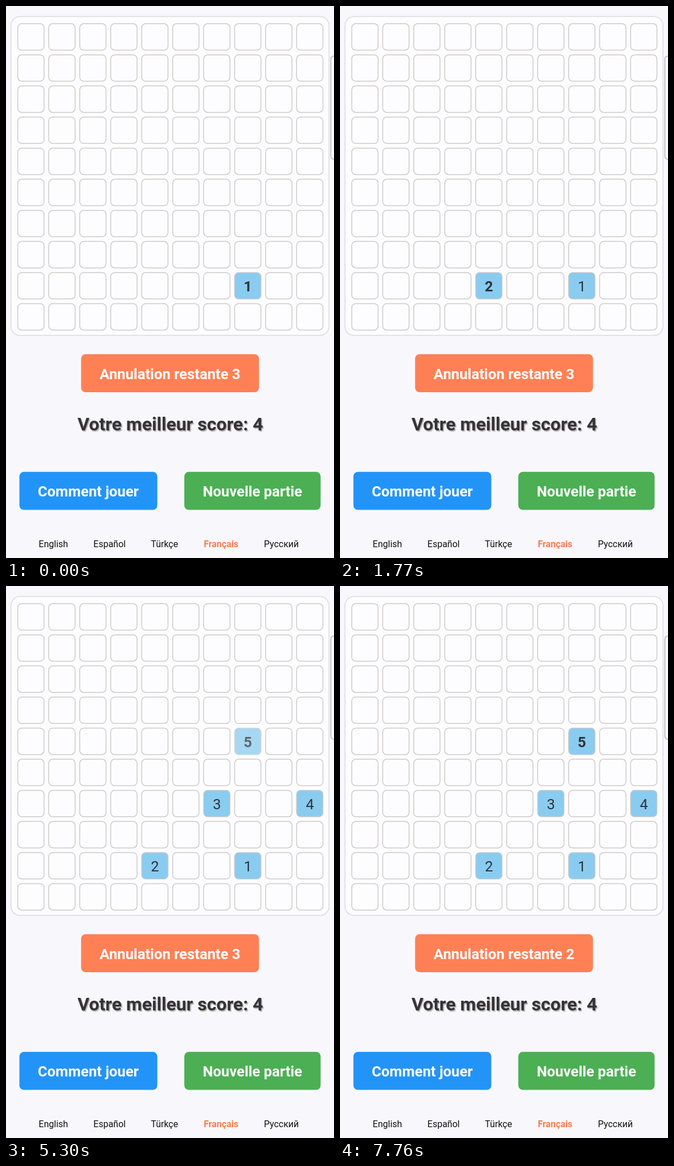
An HTML page that plays this animation: 578x969 px, repeating every 8000 ms.

```html
<!DOCTYPE html>
<html lang="fr">
<head>
<meta charset="utf-8">
<style>
  html, body { margin: 0; width: 100%; height: 100%; overflow: hidden; background: #f8f8fc; }
  svg { display: block; width: 578px; height: 969px; }
  text { font-family: Roboto, sans-serif; text-anchor: middle; }
  .cell { fill: #fdfdff; stroke: #cecbc8; stroke-width: 1.5; }
  .full { fill: #89ccf0; stroke: #c5cacd; }
  .num { font-size: 25.7px; fill: #333338; }
  .btn { font-size: 25.7px; font-weight: 700; fill: #fff; }
  .lang { font-size: 16px; fill: #111; }
  .score { font-size: 32.1px; font-weight: 700; fill: #333338; text-shadow: 1.6px 1.6px 1.6px #aaa6a0; }
</style>
</head>
<body>
<svg id="stage" viewBox="0 0 578 969">
  <rect width="578" height="969" fill="#f8f8fc"/>
  <rect x="8.7" y="18.5" width="560.6" height="559.8" rx="16" fill="#fdfdff" stroke="#dadae0" stroke-width="1.5"/>
  <g id="board"></g>
  <rect x="572.5" y="88" width="20" height="181" rx="5" fill="#fbfbfd" stroke="#b4b4b8" stroke-width="1.5"/>
  <g id="undo">
    <rect x="132.3" y="611.2" width="313.5" height="66.8" rx="8" fill="#ff8055"/>
    <text id="undoText" class="btn" x="289" y="654.6"></text>
  </g>
  <text class="score" x="289.5" y="745">Votre meilleur score: 4</text>
  <rect x="23.6" y="817.8" width="243" height="66.8" rx="8" fill="#2394f7"/>
  <text class="btn" x="145" y="861">Comment jouer</text>
  <rect x="314.2" y="817.8" width="240.2" height="66.8" rx="8" fill="#4caf54"/>
  <text class="btn" x="434.3" y="861">Nouvelle partie</text>
  <text class="lang" x="83.5" y="950">English</text>
  <text class="lang" x="182.5" y="950">Español</text>
  <text class="lang" x="279.3" y="950">Türkçe</text>
  <text class="lang" x="379" y="950" style="font-weight:700;fill:#f97c4e">Français</text>
  <text class="lang" x="485.3" y="950">Русский</text>
  <circle id="touch" r="17.6" fill="#fff" fill-opacity=".4" stroke="#bec3e1" stroke-opacity=".6" stroke-width="2"/>
</svg>
<script>
const LOOP = 8000, PITCH = 54.6, LOW = 0.2, FADE_IN = 150, FADE_OUT = 250;
const $ = id => document.getElementById(id);

// Taps on board cells: each places the next number when released
const taps = [
  { row: 8, col: 7, down: -900, up: -600 },
  { row: 8, col: 4, down: 50, up: 520 },
  { row: 6, col: 6, down: 2110, up: 2420 },
  { row: 6, col: 9, down: 3240, up: 3530 },
  { row: 4, col: 7, down: 4910, up: 5150 },
  { row: 7, col: 7, down: 6090, up: 6330 }
];
const undoTap = { down: 7070, up: 7360, x: 338, y: 658.5 };

function add(parent, tag, attrs) {
  const el = document.createElementNS("http://www.w3.org/2000/svg", tag);
  for (const key in attrs) el.setAttribute(key, attrs[key]);
  return parent.appendChild(el);
}

const cells = [];
for (let row = 0; row < 10; row++) {
  for (let col = 0; col < 10; col++) {
    const x = 20.7 + col * PITCH, y = 31.1 + row * PITCH;
    const group = add($("board"), "g", {});
    const box = add(group, "rect", { x, y, width: 46.4, height: 46.4, rx: 7, class: "cell" });
    const label = add(group, "text", { x: x + 23.3, y: y + 33.1, class: "num" });
    cells.push({ group, box, label });
  }
}
for (const tap of taps) {
  tap.cell = cells[tap.row * 10 + tap.col];
  tap.x = 47 + tap.col * PITCH;
  tap.y = 56 + tap.row * PITCH;
}

const ease = p => p < 0.5 ? 2 * p * p : 1 - 2 * (1 - p) * (1 - p);
const ramp = (t, start, span) => ease(Math.min(1, Math.max(0, (t - start) / span)));

function pressOpacity(t, tap) {
  return t < tap.up
    ? 1 - (1 - LOW) * ramp(t, tap.down, FADE_IN)
    : LOW + (1 - LOW) * ramp(t, tap.up, FADE_OUT);
}

function draw(t) {
  const undone = t >= undoTap.up;
  let count = taps.filter(tap => t >= tap.up).length;
  if (undone) count--;

  taps.forEach((tap, i) => {
    const { group, box, label } = tap.cell, full = i < count;
    group.setAttribute("opacity", pressOpacity(t, tap));
    box.setAttribute("class", full ? "cell full" : "cell");
    label.textContent = full ? i + 1 : "";
    label.setAttribute("font-weight", i === count - 1 ? 700 : 400);
  });

  $("undo").setAttribute("opacity", pressOpacity(t, undoTap));
  $("undoText").textContent = "Annulation restante " + (undone ? 2 : 3);

  const held = [...taps, undoTap].find(tap => t >= tap.down && t < tap.up + 75);
  const touch = $("touch");
  touch.setAttribute("visibility", held ? "visible" : "hidden");
  if (held) {
    touch.setAttribute("cx", held.x);
    touch.setAttribute("cy", held.y);
  }
}

const start = performance.now();
function tick() {
  draw((performance.now() - start) % LOOP);
  requestAnimationFrame(tick);
}
tick();
</script>
</body>
</html>
```
